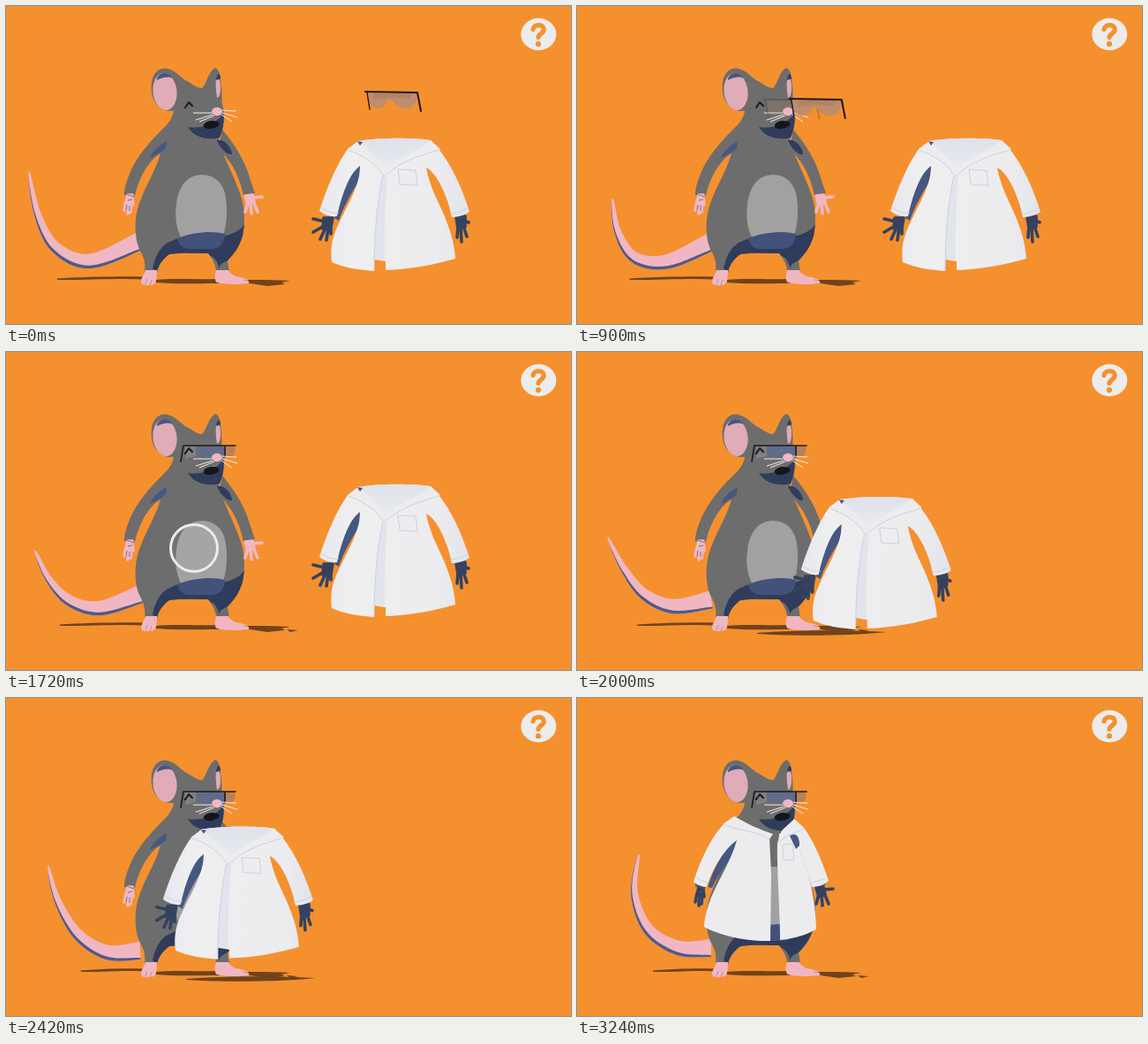
Recreate the animation shown at these times as an HTML page. Size 640 by 360 pixels, loop 3.41 s.

```html
<!DOCTYPE html>
<html lang="en">
<head>
<meta charset="utf-8">
<title>Dress the mouse</title>
<style>
  html, body { margin: 0; width: 100%; height: 100%; overflow: hidden; background: #f5902e; }
  svg { display: block; width: 100vw; height: 100vh; }
  .fur { fill: #6d6d6d; }
  .navy { fill: #2f3c5b; }
  .blue { fill: #465782; }
  .pink { fill: #f0b7c3; }
  .ear { fill: #dfacb8; }
  .cloth { fill: #ececee; }
  .seam { fill: none; stroke: #ccd1de; stroke-width: 1; }
  .dark { fill: none; stroke: #1c1a1f; stroke-width: 2; stroke-linecap: round; stroke-linejoin: round; }
  .hand { color: #f0b7c3; fill: currentColor; stroke: currentColor; stroke-width: 3.6; stroke-linecap: round; stroke-linejoin: round; }
  .glove { color: #35425f; }
  .crease { fill: none; stroke: #56618a; stroke-width: .8; }
  .gloved .crease { stroke: #4d5c85; }
  .gloved .hand { color: #35425f; }
  .shadow { fill: #70431b; }
</style>
</head>
<body>
<svg viewBox="0 0 640 360" preserveAspectRatio="none">
  <defs>
    <linearGradient id="clothFill" x1="0" x2="1">
      <stop offset="0" stop-color="#e6e8ef"/><stop offset=".2" stop-color="#efeff0"/>
      <stop offset=".8" stop-color="#ececee"/><stop offset="1" stop-color="#e2e4ec"/>
    </linearGradient>
    <linearGradient id="neckFill" x1="0" x2="0" y1="0" y2="1">
      <stop offset="0" stop-color="#dfe2ea"/><stop offset="1" stop-color="#e9ebf0"/>
    </linearGradient>
    <g id="goggles">
      <path fill="#c08c6a" d="M410 98L466 99C466 107 464 113 457 116C449 117 443 115 440 110C437 105 432 106 429 112C427 117 420 117 415 114C411 111 411 104 410 98Z"/>
      <path fill="#a87c62" opacity=".55" d="M416 99H460L456 106C444 102 428 103 417 107Z"/>
      <path class="dark" d="M407 97L466 98L470 119"/>
      <path class="dark" style="stroke-width:1.400" d="M409 98L412 117"/>
    </g>
  </defs>

  <rect width="640" height="360" fill="#f5902e"/>

  <ellipse cx="603.300" cy="32" rx="20" ry="18.200" fill="#ececec"/>
  <path d="M597 26.500C597.500 20 609.300 20 609.300 26.500C609.300 31 603.500 31 603 35.500" fill="none" stroke="#f5902e" stroke-width="5.200" stroke-linecap="round"/>
  <circle cx="603" cy="43" r="3.100" fill="#f5902e"/>

  <g class="shadow">
    <path id="tailShadow"/>
    <path d="M170 310C190 308 215 310 240 309C265 311 295 309 322 311L312 313L316 315L296 317L276 314L240 314C215 314 190 315 170 313Z"/>
    <path id="farShadow" d="M318 314L331 315L322 317Z"/>
    <path id="coatShadow" d="M204 318C240 315 300 314 350 317C320 321 245 322 204 319Z"/>
  </g>

  <g id="mouse">
    <path id="tail" class="pink"/>
    <path id="tailShade" fill="#4f5b87"/>

    <path class="fur" d="M190 119C187 118 184 120 181 118C168 115 163 100 165 86C167 74 175 69 183 71C192 73 196 79 203 84C210 87 216 93 222 93C227 89 229 74 237 70C243 72 243 82 244 92C245 100 244 106 245 112C248 120 248 130 245 136C243 142 241 147 241 152C246 170 258 192 265 212C271 228 271 245 268 260C264 274 256 282 251 288L253 302H238C238 294 235 288 229 280C215 280 195 279 185 281C177 287 172 294 171 302H157C158 292 157 286 152 277C146 266 145 246 149 230C155 208 168 190 174 170C177 160 178 148 177 141C182 135 189 127 190 119Z"/>
    <path class="fur" d="M187 130C170 146 149 167 140 190C136 200 134 206 134 214L146 215C149 200 157 182 169 171C176 166 182 162 184 155Z"/>
    <path class="fur" d="M245 140C258 155 268 171 274 188C277 198 280 206 282 212L269 215C266 200 260 184 250 172L241 160Z"/>

    <path class="blue" d="M182 153C174 157 166 164 163 172C170 168 178 165 181 161Z"/>
    <path class="navy" d="M239 152C246 150 255 158 256 168C251 169 243 162 239 152Z"/>
    <path fill="#a1a1a2" d="M222 191C205 191 195 205 193 225C191 240 193 252 199 264C205 270 240 270 246 260C251 245 251 225 248 212C245 200 236 191 222 191Z"/>
    <path class="navy" d="M270 247C264 257 250 260 240 262C215 260 196 261 188 266C176 270 170 280 166 297L171 302C172 294 177 287 185 281C197 279 215 280 229 280C233 286 237 281 242 298C241 292 246 291 251 288C258 281 264 274 268 260Z"/>
    <path fill="#42527a" d="M194 263C210 256 236 254 248 258C247 269 242 275 232 275H206C199 274 195 269 194 263Z"/>

    <ellipse class="ear" cx="180" cy="97" rx="13.500" ry="21" transform="rotate(-6 180 97)"/>
    <path fill="#46557f" d="M171 82C174 74 184 74 189 82C183 79 177 81 171 84Z"/>
    <path class="ear" d="M238 83C241 80 243 84 243 92C243 99 242 103 239 104C238 97 237 90 238 83Z"/>
    <path class="navy" d="M238 84C239 76 242 74 243 82Z"/>
    <path class="navy" d="M206 137C218 139 236 136 246 122C248 135 244 144 242 149C230 152 214 150 206 137Z"/>
    <ellipse fill="#15151c" cx="232.500" cy="134.500" rx="9" ry="4.400" transform="rotate(-8 232 134)"/>
    <path class="dark" d="M203 115L207 109L211 113"/>

    <path class="pink" d="M158 299C156 305 151 311 154 315C158 317 163 316 168 315C171 310 171 305 171 299ZM238 299C236 305 236 311 239 313C250 316 264 315 275 314C277 309 266 307 260 306C256 304 253 302 252 299Z"/>
    <path class="crease" stroke-opacity=".5" d="M158 315L160 309M163 316L165 310M268 310L274 311"/>

    <g class="hand">
      <path d="M138 214L143 214L143 223L136 223Z"/>
      <path fill="none" d="M136 221L134 231M139 223L138 235M142 222L141 233M143 217L144 225"/>
    </g>
    <path class="crease" d="M134 212L145 216M137 225L136 231M140 226L140 232M138 220L143 219"/>
    <g class="hand">
      <path d="M271 215L279 214L281 222L274 225Z"/>
      <path fill="none" d="M274 222L271 233M277 223L278 235M280 221L285 233M280 217L290 216"/>
    </g>

    <g id="worn">
      <path class="blue" d="M181 160C166 171 156 190 148 214L153 215C161 196 174 184 181 167Z"/>
      <path class="cloth" d="M178 134L166 143C150 160 139 186 132 208C137 212 142 214 147 214C153 194 166 172 181 161C174 187 156 212 149 234C146 244 144 252 144 259C160 268 190 276 219 275L220 200L218 158L204 148Z"/>
      <path class="cloth" d="M232 150L246 137L257 147C269 163 278 186 285 207C279 212 272 214 266 214C262 200 258 186 252 172C260 192 270 220 271 262C258 269 244 273 230 274C230 240 226 190 227 164Z"/>
      <path class="blue" d="M241 156C248 152 252 156 252 167L248 171Z"/>
      <path class="cloth" d="M178 134L165 143C182 149 202 150 218 160L222 154C208 149 190 142 178 134ZM246 137L257 147C251 153 238 153 228 164L229 154C237 149 242 143 246 137Z"/>
      <path class="seam" d="M166 143C182 150 202 150 218 160M257 147C251 153 238 153 228 164M233 166L244 165L246 183L234 184ZM134 203L149 210M264 210L283 204"/>
    </g>

    <g id="wornGoggles">
      <path fill="#85878f" opacity=".75" d="M203 107H215V118L203 121Z"/>
      <path fill="#616c8a" d="M216 107H248V119H221C217 118 216 113 216 107Z"/>
      <path fill="#b9805a" d="M248 107H259C260 113 259 118 254 119H248Z"/>
      <path class="dark" style="stroke-width:1.600" d="M198 124L201 106H260M248 107V119"/>
      <path class="dark" d="M203 115L207 109L211 113"/>
    </g>

    <ellipse class="pink" cx="239" cy="119.500" rx="6" ry="4.700"/>
    <path fill="none" stroke="#f1ecec" stroke-width="1" d="M212 121L233 121M215 129L234 123M219 131L236 124M245 118L261 119M245 121L262 126M244 123L256 131"/>
  </g>

  <g id="coat">
    <g class="hand glove">
      <path d="M360 240L370 240L368 251L359 252Z"/>
      <path fill="none" d="M361 244L348 241M360 249L348 256M362 251L356 264M365 251L363 265M368 249L368 258"/>
      <path d="M510 239L520 238L520 250L512 252Z"/>
      <path fill="none" d="M519 243L524 245M512 249L511 262M515 251L516 267M518 249L522 261"/>
    </g>
    <path class="blue" d="M401 179C388 190 380 212 372 240L377 243C382 228 392 210 400 198Z"/>
    <path fill="url(#clothFill)" d="M399 153L387 162C374 180 363 207 355 232C361 237 369 239 375 238C380 216 388 190 401 181C402 208 376 240 370 265C368 274 368 283 369 290C382 296 400 299 417 300V287L430 289V299C458 298 485 293 509 286C508 268 502 250 495 234C487 216 480 204 476 183C488 189 500 214 505 239C512 239 520 237 525 233C517 208 506 182 491 163L481 152C455 149 425 149 399 153Z"/>
    <path fill="#e1e4eb" d="M427 190C421 225 417 260 417 298L417 287H429C428 254 430 222 432 189Z"/>
    <path fill="url(#neckFill)" d="M399 153C420 149 462 149 481 152C472 164 450 175 430 189C420 176 406 168 399 153Z"/>
    <path class="cloth" d="M400 152L387 162C402 168 418 177 426 190L431 184C423 171 408 164 400 152ZM481 152L492 162C474 168 450 174 432 190L430 184C444 170 468 164 481 152Z"/>
    <path class="seam" d="M387 163C402 168 418 177 426 190M490 163C474 168 450 174 432 190M444 185L464 186L466 203L446 202ZM357 228C364 233 371 235 377 234M503 235C511 235 518 232 523 229M427 191C420 225 417 260 417 300"/>
    <path class="blue" d="M398 153L404 154L401 158Z"/>
  </g>

  <use id="gogglesGhost" href="#goggles" opacity=".2"/>
  <use id="gogglesMain" href="#goggles"/>

  <g id="cursor">
    <ellipse id="smear" cy="222" ry="25.500" fill="#ffd9b0"/>
    <circle id="ring" cy="222" r="26.500" fill="#fff" stroke="#ececec"/>
  </g>
</svg>
<script>
const LOOP = 3410, STEP = 68.94, LAST = 47;
const $ = id => document.getElementById(id);
const clamp = (v, a = 0, b = 1) => Math.min(b, Math.max(a, v));
const smooth = u => u * u * (3 - 2 * u);
const linear = u => u;
const show = (id, on) => $(id).style.display = on ? '' : 'none';
const move = (id, [x, y]) => $(id).setAttribute('transform', `translate(${x.toFixed(2)} ${y.toFixed(2)})`);

// Each key: [time, ...values]
function track(keys, t, ease = linear) {
  let i = 0;
  while (i < keys.length - 2 && t >= keys[i + 1][0]) i++;
  const a = keys[i], b = keys[i + 1];
  const u = ease(clamp((t - a[0]) / (b[0] - a[0])));
  return a.slice(1).map((v, n) => v + (b[n + 1] - v) * u);
}

// Five joints of the tail, from tip to body
const tailKeys = [
  [0, 26, 188, 36, 236, 56, 273, 95, 289, 152, 266],
  [550, 37, 206, 43, 248, 62, 283, 100, 289, 152, 264],
  [1240, 43, 230, 49, 262, 68, 286, 103, 290, 152, 270],
  [1720, 31, 224, 49, 257, 73, 281, 107, 290, 152, 275],
  [2140, 37, 203, 55, 239, 78, 271, 111, 287, 152, 283],
  [2420, 48, 190, 59, 230, 82, 268, 115, 288, 152, 286],
  [3240, 70, 177, 65, 221, 81, 262, 115, 283, 152, 283]
];
const gogglesKeys = [[480, 0, 0], [550, -2, 4], [1035, -207, 9]];
const coatKeys = [[1750, 0, 0], [2140, -144, 20], [2420, -178, -5], [2640, -219, -12]];
const shadowKeys = [[0, 58], [1720, 61], [2140, 72], [2420, 85], [3240, 86]];

function spline(p, u) {
  const n = p.length - 1, i = Math.min(n - 1, Math.floor(u * n)), f = u * n - i;
  const at = k => p[clamp(k, 0, n)];
  const [a, b, c, d] = [at(i - 1), at(i), at(i + 1), at(i + 2)];
  return [0, 1].map(k => b[k] + .5 * f * (c[k] - a[k] +
    f * (2 * a[k] - 5 * b[k] + 4 * c[k] - d[k] + f * (3 * (b[k] - c[k]) + d[k] - a[k]))));
}

const outline = pts => 'M' + pts.map(p => p.map(v => v.toFixed(1)).join(' ')).join('L') + 'Z';

function drawTail(t) {
  const v = track(tailKeys, t);
  const joints = [0, 2, 4, 6, 8].map(i => [v[i], v[i + 1]]);
  const outer = [], inner = [], shade = [], n = 32;
  for (let i = 0; i <= n; i++) {
    const u = i / n, [x, y] = spline(joints, u);
    const [ax, ay] = spline(joints, Math.max(0, u - .01));
    const [bx, by] = spline(joints, Math.min(1, u + .01));
    const len = Math.hypot(bx - ax, by - ay) || 1;
    const nx = (ay - by) / len, ny = (bx - ax) / len;
    const w = .9 + 9.3 * Math.pow(u, .8);
    const s = w * (1 - .5 * Math.sin(Math.PI * Math.min(1, u * .85 + .04)));
    outer.push([x + nx * w, y + ny * w]);
    inner.unshift([x - nx * w, y - ny * w]);
    shade.unshift([x + nx * s, y + ny * s]);
  }
  $('tail').setAttribute('d', outline(outer.concat(inner)));
  $('tailShade').setAttribute('d', outline(outer.concat(shade)));
}

function drawCursor(t) {
  const on = t >= 1103 && t < 1850;
  show('cursor', on);
  if (!on) return;
  const rest = 1 - clamp((t - 1103) / 415), speed = rest * rest;
  const x = 440 - 227 * (1 - rest ** 3);
  $('cursor').setAttribute('opacity', clamp((1850 - t) / 110));
  $('ring').setAttribute('cx', x);
  $('ring').setAttribute('stroke-width', 3 + 4 * speed);
  $('ring').setAttribute('fill-opacity', .04 + .5 * speed);
  $('smear').setAttribute('cx', x);
  $('smear').setAttribute('rx', 26 + 31 * speed);
  $('smear').setAttribute('opacity', speed > 0 ? .4 : 0);
}

function draw(time) {
  const t = Math.min(LAST, Math.floor((time % LOOP + 2) / STEP)) * STEP;
  const goggled = t >= 1100, dressed = t >= 2680;

  drawTail(t);
  const sx = track(shadowKeys, t)[0];
  $('tailShadow').setAttribute('d', `M${sx} 308.500C${sx + 25} 307 125 306 156 306.500L157 309.500C130 308 ${sx + 40} 310 ${sx} 310Z`);

  show('gogglesMain', !goggled);
  show('gogglesGhost', t > 490 && !goggled);
  move('gogglesMain', track(gogglesKeys, t, smooth));
  move('gogglesGhost', track(gogglesKeys, t + STEP, smooth));
  show('wornGoggles', goggled);
  show('farShadow', goggled);

  show('coat', !dressed);
  move('coat', track(coatKeys, t, t < 2140 ? smooth : linear));
  show('coatShadow', t > 1980 && !dressed);
  show('worn', dressed);
  $('mouse').classList.toggle('gloved', dressed);

  drawCursor(t);
}

const start = performance.now();
function tick() {
  draw(performance.now() - start);
  requestAnimationFrame(tick);
}
tick();
</script>
</body>
</html>
```
